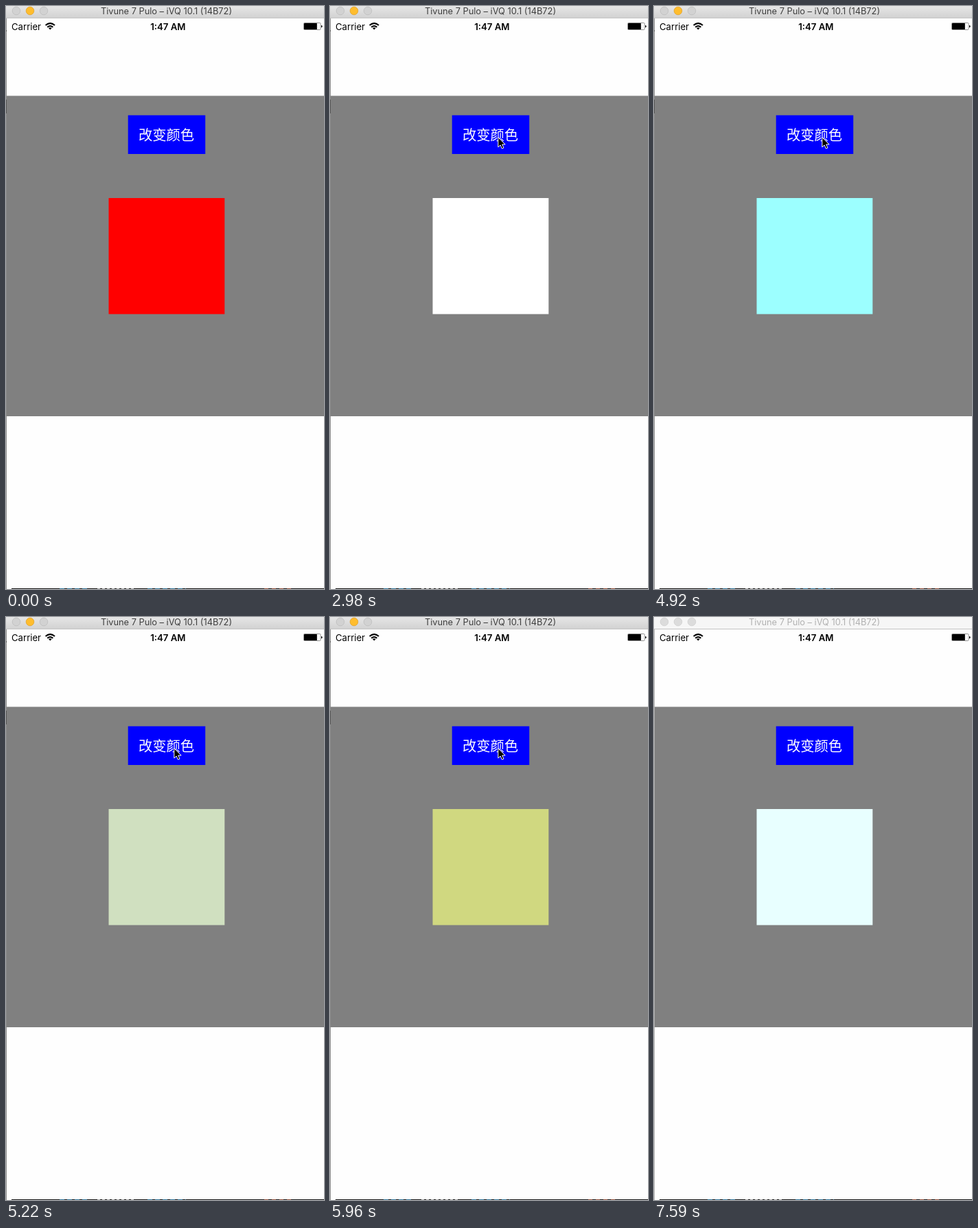
Write an HTML page that moves like this. It is 463 px wide and 847 px high and loops after 8070 ms.

```html
<!DOCTYPE html>
<html lang="zh">
<head>
<meta charset="utf-8">
<title>改变颜色</title>
<style>
html, body { margin: 0; width: 100%; height: 100%; overflow: hidden; background: #fefefe; }
svg { display: block; width: 463px; height: 847px; }
text { text-anchor: middle; font-family: Inter, "Open Sans", sans-serif; font-size: 13.2px; }
#title { font-size: 12.8px; fill: #3e3e3e; }
#label { font-family: "Noto Sans CJK SC", "Noto Sans CJK", "Noto Sans CJK JP", sans-serif; font-size: 20.3px; fill: #fff; }
#lights circle { fill: #d2d2d2; stroke: #bebebe; stroke-width: .8; }
#lights .amber { fill: #ffbd2e; stroke: #e2a32b; }
.idle #bar { fill: #f6f6f6; }
.idle #title { fill: #b1b1b1; }
.idle #lights circle { fill: #dcdcdc; stroke: #d0d0d0; }
.idle #edge { fill: #b4b4b4; }
.idle #notch { display: none; }
</style>
</head>
<body>
<svg id="stage" viewBox="0 0 463 847">
  <defs>
    <linearGradient id="metal" x1="0" y1="0" x2="0" y2="1">
      <stop offset="0" stop-color="#e6e6e6"/>
      <stop offset="1" stop-color="#d2d2d2"/>
    </linearGradient>
  </defs>

  <rect width="463" height="847" fill="#fefefe"/>
  <rect id="bar" width="463" height="17" fill="url(#metal)"/>
  <rect y="17" width="463" height="1" fill="#c4c4c4"/>
  <g id="lights">
    <circle cx="15" cy="7" r="5.8"/>
    <circle class="amber" cx="35" cy="7" r="5.8"/>
    <circle cx="55" cy="7" r="5.8"/>
  </g>
  <text id="title" x="233.5" y="12">Tivune 7 Pulo – iVQ 10.1 (14B72)</text>

  <text x="29.5" y="34.7">Carrier</text>
  <g fill="none" stroke="#000" stroke-width="2">
    <path d="M57.6 28.1Q64.3 22.2 71 28.1"/>
    <path d="M60.2 30.8Q64.3 27.1 68.4 30.8"/>
  </g>
  <path d="M61.9 32.1Q64.3 30.4 66.7 32.1L64.3 34.6z"/>
  <text x="235.8" y="34.7" font-weight="600">1:47 AM</text>
  <rect x="433.5" y="24.5" width="24.5" height="10" rx="1.2" fill="#fff" stroke="#777" stroke-width=".8"/>
  <rect x="434" y="25" width="18.8" height="9" rx=".6"/>
  <path d="M459 27.8q1.6 .4 1.6 1.8t-1.6 1.8z"/>

  <rect x="1" y="130.5" width="462" height="465.5" fill="#808080"/>
  <rect x="177.7" y="158.7" width="112.5" height="56.3" fill="#00f"/>
  <text id="label" x="233.6" y="194.5">改变颜色</text>
  <rect id="box" x="149.5" y="279" width="168.8" height="168.6" fill="#f00"/>

  <rect id="edge" y="18" width="1" height="829" fill="#8c8c8c"/>
  <path id="notch" d="M0 35h1v2h-1zM0 136h1v20h-1z" fill="#555"/>
  <path d="M8 846h455v1H8z" fill="#111"/>
  <path d="M133 846.5h56" stroke="#aaa" stroke-dasharray="4 3"/>
  <path d="M78 846.5h44M206 846.5h56" stroke="#2b6f94" stroke-dasharray="7 4"/>
  <path d="M376 846.5h44" stroke="#8c4934" stroke-dasharray="6 5"/>

  <path id="cursor" d="M0 0V14.2L3.3 11.2L5.6 16.4L8.1 15.3L5.9 10.3H10.3Z"
        stroke="#fff" stroke-linejoin="round"/>
</svg>
<script>
const LOOP = 8070, STEP = 148.5;
const $ = id => document.getElementById(id);
const stage = $('stage'), box = $('box'), cursor = $('cursor');

// Each entry holds its colour until the next one.
const colours = [
  [0, '#ff0000'],
  [2240, '#ff7048'], [2390, '#ffd880'],
  [2830, '#fff0c8'], [2980, '#ffffff'],
  [3430, '#e8ffd0'], [3580, '#d0ffa0'],
  [3880, '#d8e8c0'], [4020, '#e0d0e0'],
  [4320, '#b8e0ff'],
  [4920, '#9cffff'], [5070, '#b0f0e0'], [5220, '#d0e0c0'], [5370, '#d8e8a0'],
  [5520, '#c0f488'], [5660, '#a4ff6b'], [5810, '#b8e878'], [5960, '#d0d880'],
  [6110, '#d8c870'], [6260, '#ccb650'], [6410, '#bfa433'], [6550, '#d0cc80'],
  [6700, '#dce8c0'], [6850, '#e8ffff']
];

const home = [244.8, 190.8];
const moves = [
  { start: 900, steps: 6, from: [372, 786], to: home, ease: p => 1 - (1 - p) ** 1.7 },
  { start: 6700, steps: 3, from: home, to: [458, 842], ease: p => p ** 1.4 }
];

function cursorAt(t) {
  const move = moves[t < 6700 ? 0 : 1];
  const n = Math.floor((t - move.start + 2) / STEP);
  const k = move.ease(Math.min(1, Math.max(0, n / move.steps)));
  return move.from.map((v, i) => v + (move.to[i] - v) * k);
}

function draw(t) {
  box.setAttribute('fill', colours.filter(c => c[0] <= t).pop()[1]);
  const visible = t >= 900 && t < 7290;
  cursor.setAttribute('visibility', visible ? 'visible' : 'hidden');
  if (visible) cursor.setAttribute('transform', `translate(${cursorAt(t)})`);
  stage.classList.toggle('idle', t >= 7290);
}

const began = performance.now();
function tick() {
  draw((performance.now() - began) % LOOP);
  requestAnimationFrame(tick);
}
tick();
</script>
</body>
</html>
```
